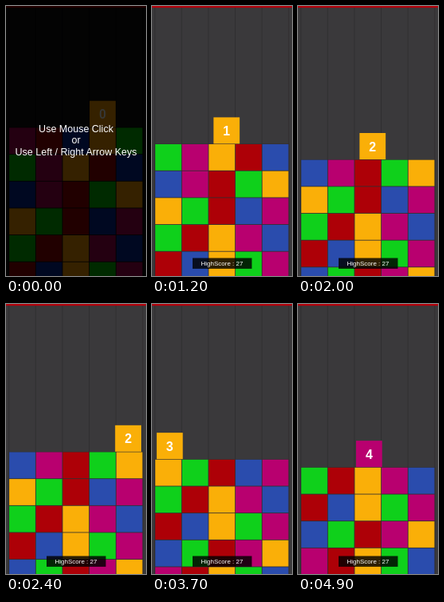
Animation, 176 px wide and 338 px high, one loop 5000 ms. Source, as an HTML page:

```html
<!DOCTYPE html>
<html lang="en">
<head>
<meta charset="utf-8">
<title>Colour tile game</title>
<style>
  html, body { margin: 0; width: 100%; height: 100%; overflow: hidden; background: #3a393b; }
  svg { display: block; width: 176px; height: 338px; }
  text { font-family: "Liberation Sans", Arial, sans-serif; fill: #fff; text-anchor: middle; }
</style>
</head>
<body>
<svg viewBox="0 0 176 338">
  <g id="scene">
    <rect width="176" height="338" fill="#3a393b"/>
    <g id="lines" stroke="#313032"></g>
    <rect width="176" height="2.2" fill="#b3000c"/>
    <g id="board"></g>
    <g id="player">
      <rect width="32.8" height="33"/>
      <text x="16.4" y="22.7" font-size="16" font-weight="bold"></text>
    </g>
  </g>
  <g id="best">
    <rect x="51" y="315.5" width="74.5" height="13.4" fill="#000" fill-opacity=".82"/>
    <text x="88" y="325" font-size="8">HighScore : 27</text>
  </g>
  <g id="intro" font-size="12.5">
    <text x="88" y="157.7">Use Mouse Click</text>
    <text x="88" y="172.2">or</text>
    <text x="88" y="186.7">Use Left / Right Arrow Keys</text>
  </g>
</svg>
<script>
const LOOP = 5000, STEP = 100, PITCH = 33.65, TILE = 32.8, LEFT = 4.1;
const COLORS = { G: '#0fd01b', M: '#b8006f', O: '#faaf08', R: '#ad0007', B: '#2a4cad' };
const ROWS = ['MRBOG', 'GMORB', 'BMRGO', 'OGRBM', 'GROMB', 'RBOGM', 'BGRMO', 'MROGB'];

// The player reaches each column at its hit time, which clears the row below
const HITS = [
  { time: 430, col: 3 }, { time: 1280, col: 2 }, { time: 2410, col: 4 },
  { time: 3706, col: 0 }, { time: 5043, col: 3 }
];
const START = HITS[0].time, SLIDE = 450, FALL = 220;

const $ = s => document.querySelector(s);
const clamp = v => Math.max(0, Math.min(1, v));
const move = (el, x, y) => el.setAttribute('transform', `translate(${x.toFixed(2)} ${y.toFixed(2)})`);

function add(parent, tag, attrs) {
  const el = document.createElementNS('http://www.w3.org/2000/svg', tag);
  for (const k in attrs) el.setAttribute(k, attrs[k]);
  return parent.appendChild(el);
}

for (let i = 0; i < 6; i++) {
  const x = LEFT - 0.5 + i * PITCH;
  add($('#lines'), 'line', { x1: x, x2: x, y1: 2, y2: 338 });
}

const scene = $('#scene'), board = $('#board'), player = $('#player');
const [body, label] = player.children;
const backing = add(board, 'rect', {
  x: LEFT - 0.8, width: PITCH * 5 + 0.8, height: 400, fill: '#302f31'
});
const rows = ROWS.map((row, r) => {
  const g = add(board, 'g', {});
  [...row].forEach((c, i) => add(g, 'rect', {
    x: LEFT + i * PITCH, y: r * PITCH, width: TILE, height: TILE, fill: COLORS[c]
  }));
  return g;
});

// The board rises slightly faster as the game goes on
function boardTop(t) {
  const s = Math.max(0, t - START) / 1000;
  return 152.4 - 16.6 * s - 0.4 * s * s;
}

function column(t) {
  return HITS.reduce((x, h) => x + (h.col - x) * clamp((t - h.time + SLIDE) / SLIDE), HITS[0].col);
}

function draw(t) {
  const top = boardTop(t);
  const score = HITS.filter(h => t >= h.time).length;
  const drop = HITS.reduce((sum, h) => sum + clamp((t - h.time) / FALL) ** 2, 0);

  move(board, 0, top);
  backing.setAttribute('y', score * PITCH - 0.6);
  rows.forEach((g, r) => g.style.display = r < score ? 'none' : '');

  move(player, LEFT + column(t) * PITCH, top + (drop - 1) * PITCH);
  body.setAttribute('fill', score < 4 ? COLORS.O : COLORS.M);
  label.textContent = score;

  const dim = 1 - clamp((t - 50) / 400);
  scene.style.filter = dim ? `brightness(${1 - 0.764 * dim}) contrast(${1 + 0.094 * dim})` : 'none';
  $('#intro').style.opacity = dim;
  $('#best').style.opacity = 1 - dim;
}

const start = performance.now();
function tick() {
  const t = (performance.now() - start) % LOOP;
  draw(Math.floor(t / STEP) * STEP);
  requestAnimationFrame(tick);
}
tick();
</script>
</body>
</html>
```
